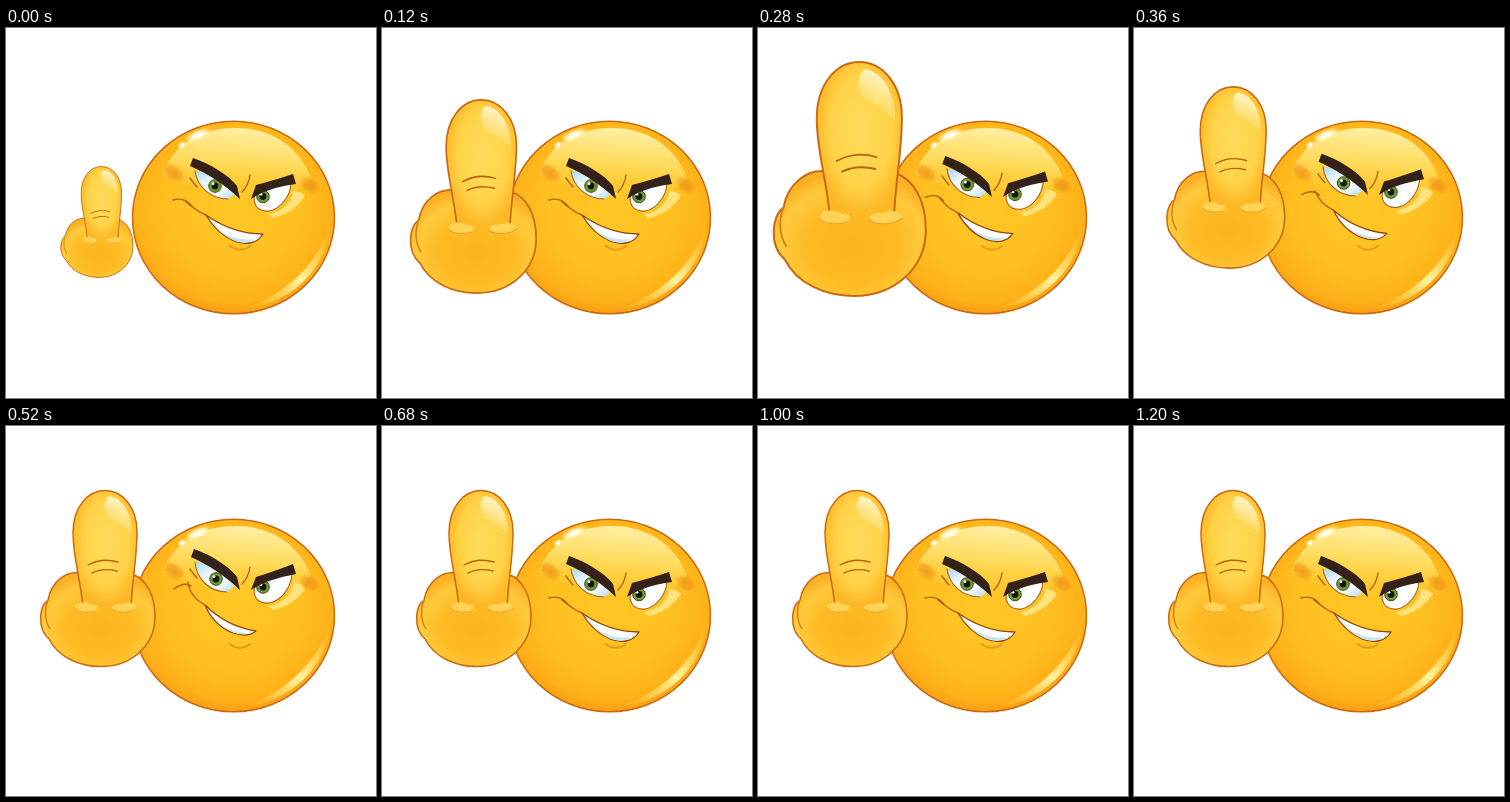
These frames come from a looping animation (370 by 370 pixels, 1440 ms). An HTML page:

```html
<!DOCTYPE html>
<html lang="en">
<head>
<meta charset="utf-8">
<title>Rude smiley</title>
<style>
html, body { margin: 0; width: 100%; height: 100%; overflow: hidden; background: #fff; }
svg { display: block; width: 100vw; height: 100vh; }
.line { fill: none; stroke: #b8620c; stroke-width: 1.4; stroke-linecap: round; stroke-linejoin: round; }
.skin { stroke: #c96a12; stroke-width: 1.5; stroke-linejoin: round; }
</style>
</head>
<body>
<svg viewBox="0 0 370 370">
  <defs>
    <radialGradient id="ball" cx=".5" cy=".45" r=".56">
      <stop offset="0" stop-color="#ffc726"/>
      <stop offset=".6" stop-color="#ffbf20"/>
      <stop offset=".87" stop-color="#feb118"/>
      <stop offset="1" stop-color="#f89c12"/>
    </radialGradient>
    <linearGradient id="gloss" x1=".65" x2=".5" y2="1">
      <stop offset="0" stop-color="#fff0a6"/>
      <stop offset=".45" stop-color="#ffdf66" stop-opacity=".9"/>
      <stop offset="1" stop-color="#ffcb30" stop-opacity="0"/>
    </linearGradient>
    <linearGradient id="rim" x1="0" y1="1" x2="1" y2="0">
      <stop offset="0" stop-color="#ffd63c" stop-opacity="0"/>
      <stop offset=".5" stop-color="#fff2a0"/>
      <stop offset="1" stop-color="#ffd63c" stop-opacity="0"/>
    </linearGradient>
    <radialGradient id="blush">
      <stop offset="0" stop-color="#ee9418" stop-opacity=".85"/>
      <stop offset=".6" stop-color="#f0981a" stop-opacity=".6"/>
      <stop offset="1" stop-color="#f79a10" stop-opacity="0"/>
    </radialGradient>
    <radialGradient id="shine">
      <stop offset="0" stop-color="#fff"/>
      <stop offset=".45" stop-color="#fffbe0" stop-opacity=".9"/>
      <stop offset="1" stop-color="#fff3a0" stop-opacity="0"/>
    </radialGradient>
    <radialGradient id="fist" cx=".52" cy=".6" r=".6">
      <stop offset="0" stop-color="#fdb41e"/>
      <stop offset=".5" stop-color="#febb24"/>
      <stop offset=".8" stop-color="#ffca3c"/>
      <stop offset="1" stop-color="#fbb024"/>
    </radialGradient>
    <radialGradient id="finger" cx=".52" cy=".44" r=".54">
      <stop offset="0" stop-color="#ffdb5c"/>
      <stop offset=".65" stop-color="#ffd348"/>
      <stop offset="1" stop-color="#fdb826"/>
    </radialGradient>
    <linearGradient id="fingerShine" x1=".7" x2=".3" y2="1">
      <stop offset="0" stop-color="#fffdf0"/>
      <stop offset="1" stop-color="#ffe680" stop-opacity=".1"/>
    </linearGradient>
    <linearGradient id="white" x2="1" y2="1">
      <stop offset="0" stop-color="#a5d7ee"/>
      <stop offset=".45" stop-color="#fff"/>
      <stop offset=".65" stop-color="#fff"/>
      <stop offset="1" stop-color="#a9d9ef"/>
    </linearGradient>
    <clipPath id="leftClip"><path id="leftHole"/></clipPath>
    <clipPath id="rightClip"><path id="rightHole"/></clipPath>
  </defs>

  <ellipse class="skin" cx="227.500" cy="189.500" rx="101" ry="96.300" fill="url(#ball)"/>
  <path fill="url(#gloss)" d="M156 146C170 113 198 100 230 100C264 100 294 118 305 150C296 160 280 172 258 176C226 180 196 160 156 146Z"/>
  <path fill="url(#rim)" d="M236 281C280 278 321 244 325 196C312 234 283 266 236 281Z"/>
  <ellipse cx="192" cy="107" rx="15" ry="5.500" transform="rotate(-23 192 107)" fill="url(#shine)"/>
  <ellipse cx="176" cy="117" rx="5" ry="3.500" transform="rotate(-38 176 117)" fill="url(#shine)"/>
  <ellipse cx="304" cy="157" rx="12" ry="8" transform="rotate(30 304 157)" fill="url(#blush)"/>
  <ellipse cx="168" cy="145" rx="13" ry="8" transform="rotate(35 168 145)" fill="url(#blush)"/>

  <path id="cheek" fill="#ffe27a"/>
  <path id="leftEye" fill="url(#white)"/>
  <path id="rightEye" fill="url(#white)"/>
  <g clip-path="url(#leftClip)"><g id="leftIris"></g></g>
  <g clip-path="url(#rightClip)"><g id="rightIris"></g></g>
  <path id="lids" class="line" style="stroke:#a8641a;stroke-width:1.1"/>
  <path id="leftBrow" fill="#33211a"/>
  <path id="rightBrow" fill="#33211a"/>
  <path id="creases" class="line"/>
  <path id="teeth" fill="#fff" stroke="#8f4708" stroke-width="1.300" stroke-linejoin="round"/>
  <path id="teethShade" fill="#c6e4f2"/>
  <path id="smile" class="line"/>
  <path class="line" style="stroke:#e9981c;stroke-width:2" d="M224 218C230 223 238 223 244 218"/>

  <g id="hand">
    <path class="skin" fill="url(#fist)" d="M76 147C60 144 45 156 42 174C33 180 31 203 43 213C52 231 73 240.500 95 240.500C126 240.500 149 219 149 191C149 168 140 153 126 148Z"/>
    <path class="line" style="stroke:#d98012" d="M42 174C38 184 39 195 44 203"/>
    <path class="skin" fill="url(#finger)" d="M77 182C75 155 67 132 67 107C67 82 81 64.500 99 64.500C117 64.500 131 82 131 106C131 132 126 156 125 182"/>
    <path fill="url(#fingerShine)" d="M103 70C117 72 126 88 126 108C121 103 113 96 103 92C97 85 97 74 103 70Z"/>
    <path class="line" d="M82 139C91 134 102 133 112 136M86 147C94 143 103 143 111 145"/>
    <path fill="#ffd456" d="M69 181C71 175 82 175 86 179C92 177 95 183 89 185C82 188 70 187 69 181ZM106 182C108 177 114 178 117 178C122 175 130 177 131 181C130 187 111 189 106 182Z"/>
    <path class="line" style="stroke:#eaa526;stroke-width:1" d="M69 182C72 187 83 187 90 185M106 183C111 188 126 187 131 182"/>
  </g>
</svg>
<script>
const LOOP = 1440, STEP = 40;
const el = id => document.getElementById(id);

// Each feature: relaxed pose, then pose with raised brows and grin.
const poses = {
  cheek: ["M262 186C277 184 286 174 287 163C292 163 297 165 299 168C292 179 279 188 266 190Z",
          "M262 180C277 178 286 168 288 156C293 157 297 160 299 163C292 174 279 182 266 184Z"],
  leftEye: ["M189 143C191 158 204 171 222 171L229 166L210 146Z",
            "M189 136C190 152 203 166 221 166L229 159L210 139Z"],
  rightEye: ["M249 163C246 175 251 184 263 183C275 181 284 168 285 156Z",
             "M249 157C246 170 251 178 263 177C276 175 285 161 286 148Z"],
  lids: ["M189 143C191 158 204 171 222 171M249 166C246 175 251 184 263 183C275 181 284 168 285 156",
         "M189 136C190 152 203 166 221 166M249 160C246 170 251 178 263 177C276 175 285 161 286 148"],
  leftBrow: ["M187 130C204 136 223 147 231 158L234 171C217 155 202 146 184 138Z",
             "M188 123C205 129 223 140 231 151L234 164C217 148 202 139 185 131Z"],
  rightBrow: ["M250 157C264 153 276 150 287 146L290 156C276 158 260 161 245 171Z",
              "M250 151C264 147 276 142 287 138L290 148C276 151 260 154 245 164Z"],
  creases: ["M244 147C243 154 240 160 236 164M184 150C187 154 188 156 191 159",
            "M244 141C243 148 240 154 236 158M184 143C187 147 188 149 191 152"],
  teeth: ["M200 187C217 199 237 206 257 206C252 215 240 218 228 213C216 208 207 199 200 187Z",
          "M199 179C213 193 231 202 250 205C244 210 236 210 227 207C214 202 205 193 199 179Z"],
  teethShade: ["M213 202C225 210 238 213 249 211C243 216 234 215 227 212C221 209 217 206 213 202Z",
               "M211 196C221 203 232 207 243 207C238 209 232 208 227 206C221 203 216 200 211 196Z"],
  smile: ["M167 172C174 170 181 172 186 178M180 174C186 179 192 184 200 187",
          "M168 163C175 158 181 157 185 160M182 156C183 166 190 174 199 179"]
};

for (const side of ["left", "right"])
  el(side + "Iris").innerHTML =
    '<circle r="6.300" fill="#6f9a35" stroke="#37531b"/><circle r="3.400" fill="#17180d"/><circle cx="-2" cy="-2.300" r="1.400" fill="#fff"/>';

const lerp = (a, b, k) => a + (b - a) * k;

function blend(from, to, k) {
  const ends = to.match(/[\d.]+/g);
  let i = 0;
  return from.replace(/[\d.]+/g, n => lerp(+n, +ends[i++], k).toFixed(2));
}

// Keys are [time, ...values]; the values are interpolated linearly.
function sample(keys, t) {
  const i = keys.findIndex(key => key[0] > t);
  if (i < 0) return keys[keys.length - 1].slice(1);
  const a = keys[i - 1], b = keys[i];
  return a.slice(1).map((v, n) => lerp(v, b[n + 1], (t - a[0]) / (b[0] - a[0])));
}

const handKeys = [
  [0, .63, 91, 194], [200, 1.41, 92, 151.5], [240, 1.51, 92, 153],
  [280, 1.33, 92, 151], [360, 1.03, 92, 149.5], [440, 1, 92, 152.5]
];
const grinKeys = [[0, 0], [200, 0], [360, .6], [480, 1], [540, 1], [680, 0]];

function draw(t) {
  const [scale, x, y] = sample(handKeys, t);
  el("hand").setAttribute("transform", `translate(${x} ${y}) scale(${scale}) translate(-92 -152.5)`);

  const [grin] = sample(grinKeys, t);
  for (const id in poses) el(id).setAttribute("d", blend(...poses[id], grin));
  el("leftHole").setAttribute("d", el("leftEye").getAttribute("d"));
  el("rightHole").setAttribute("d", el("rightEye").getAttribute("d"));
  el("leftIris").setAttribute("transform", `translate(${lerp(209, 210, grin)} ${lerp(158, 153, grin)})`);
  el("rightIris").setAttribute("transform", `translate(257 ${lerp(168.5, 161, grin)})`);
}

const start = performance.now();
function tick() {
  const t = (performance.now() - start) % LOOP;
  draw(Math.floor(t / STEP) * STEP);
  requestAnimationFrame(tick);
}
tick();
</script>
</body>
</html>
```
